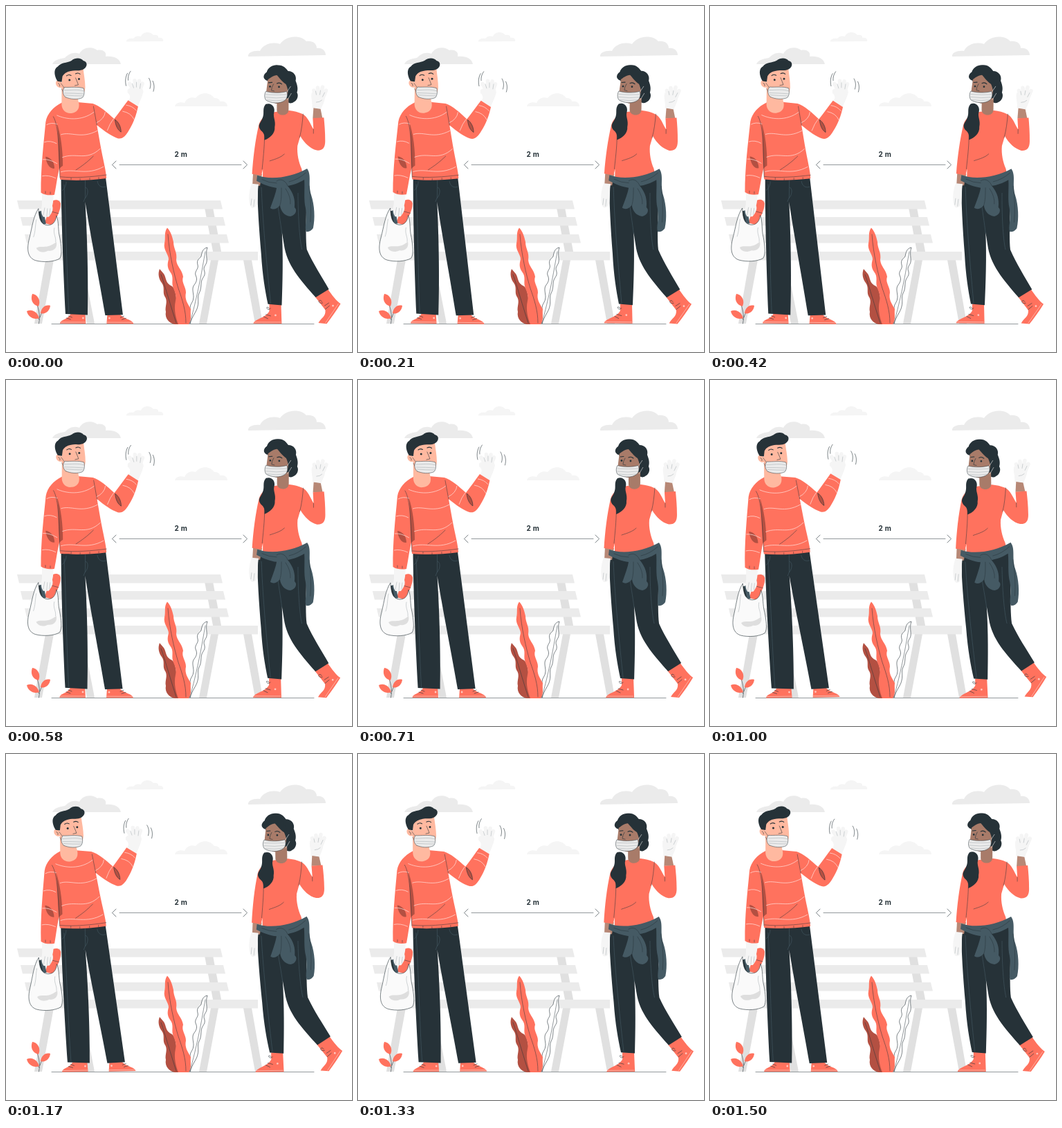
An HTML page that plays this animation: 500 px wide and 500 px high, repeating every 1.54 s.

```html
<!DOCTYPE html>
<html lang="en">
<head>
<meta charset="utf-8">
<title>Keep your distance</title>
<style>
html, body { margin: 0; width: 100%; height: 100%; overflow: hidden; background: #fff; }
svg { display: block; width: 100vw; height: 100vh; }
.coral { fill: #ff725e; }
.deep { fill: #b35042; }
.dark { fill: #263238; }
.slate { fill: #455a64; }
.glove { fill: #f5f5f5; }
.skin { fill: #ffb9a0; }
.brown { fill: #a87b69; }
.wrist { fill: #b78876; }
.mask { fill: #ebebeb; stroke: #263238; stroke-width: .5; }
.line, .fine, .brow { fill: none; stroke: #263238; stroke-width: .6; stroke-linecap: round; stroke-linejoin: round; }
.fine { stroke-width: .5; }
.brow { stroke-width: 1.1; }
.thin { fill: none; stroke: #a0a8ac; stroke-width: .5; stroke-linecap: round; }
.seam { fill: none; stroke: #455a64; stroke-width: .6; }
.knit { fill: none; stroke: #ffe3de; stroke-width: .7; }
.sole { fill: none; stroke: #ffc7be; stroke-width: .7; }
.eyelet { fill: #ffc7be; }
.finger { fill: none; stroke: #f5f5f5; stroke-width: 5.6; stroke-linecap: round; stroke-linejoin: round; }
text { font: 700 10px Inter, "Open Sans", sans-serif; letter-spacing: .3px; fill: #263238; }
</style>
</head>
<body>
<svg viewBox="0 0 500 500">
  <g id="clouds" fill="#ebebeb">
    <path d="M67 84C69 78 78 76 85 75C91 69 98 66 106 69C110 60 124 57 132 64C140 62 146 67 144 73C155 72 164 75 166 84Z"/>
    <path d="M350 73C349 67 358 64 367 65C371 56 384 51 396 55C403 44 424 40 434 51C443 50 449 54 449 61C457 60 462 65 462 71Z"/>
    <g fill="#f5f5f5">
      <path d="M174 51.5C173 48 180 46 184 47C187 43 191 43 195 44C198 37 208 36 213 42C218 41 221 43 220 46C225 45 228 48 227 51Z"/>
      <path d="M244 145C245 140 252 138 258 140C261 133 268 131 274 133C280 125 294 123 301 133C306 133 309 135 309 138C316 137 320 140 320 145Z"/>
    </g>
  </g>

  <g id="bench">
    <path fill="#e0e0e0" d="M285 281H297L312 360H300ZM57 367H69L52 459H41ZM99 367H110L128 459H117ZM296 367H307L290 459H279ZM343 367H355L371 459H360Z"/>
    <path fill="#ebebeb" d="M16 281H310L313 293.500H19ZM21 305H314L317 317.500H24ZM27 330H319L322 342.500H30ZM62 355H364V367.500H62Z"/>
  </g>

  <path class="fine" d="M66 459.500H445"/>

  <g id="sprig">
    <path class="line" d="M47.500 459C50 446 47 436 42 424M48 453C45 449 42 447 38 445M49 450C51 443 54 440 59 436"/>
    <path class="coral" d="M47 434C38 432 35 424 38 416C46 417 51 426 47 434ZM48 451C41 454 32 450 30 441C38 437 46 443 48 451ZM50 444C51 436 57 431 64 433C63 441 57 446 50 444Z"/>
  </g>

  <g id="leaves">
    <path fill="#fff" stroke="#263238" stroke-width=".6" d="M291 349C284 350 283 357 282 362C279 366 275 367 277 374C279 380 272 383 274 389C277 395 275 399 272 403C268 408 271 414 271 421C271 428 266 430 266 436C266 444 262 450 266 459C269 448 276 441 277 434C279 427 276 422 279 415C283 408 281 402 283 396C285 391 288 390 287 384C284 377 289 375 290 370C291 364 288 358 291 349Z"/>
    <path class="fine" d="M288 355C283 382 280 405 266 458"/>
    <path class="deep" d="M222 380C219 387 221 395 225 400C230 407 226 413 229 419C235 427 229 434 231 442C229 451 236 459 244 460H254C254 447 248 441 247 431C246 420 245 409 240 405C230 401 232 393 228 387Z"/>
    <path class="coral" d="M233 320.500C228 327 231 335 229 343C227 352 235 359 235 366C233 373 233 378 237 384C243 391 239 398 241 405C243 412 247 417 245 426C242 439 246 453 249 460H264C269 453 266 445 267 438C262 429 258 424 260 414C260 405 253 400 256 391C254 380 247 377 246 367C248 356 242 351 242 341C240 332 238 326 233 320.500Z"/>
    <path class="fine" d="M234 330C236 359 243 388 249 408C255 425 260 440 260 458M224 388C231 408 238 434 246 458"/>
  </g>

  <g id="gap">
    <path class="fine" d="M164 229.500H340"/>
    <path class="line" d="M159 224L153.500 229.500L159 235M343 224L348.500 229.500L343 235"/>
    <text x="252.900" y="218.200" text-anchor="middle">2 m</text>
  </g>

  <g id="man">
    <!-- shoes and trousers -->
    <path class="coral" d="M78.500 459C79 453 89 454 94 445H115L116 459ZM147 445H165C170 452 184 453 185 459H146Z"/>
    <path class="sole" d="M79 457H116M146 457H184"/>
    <path class="line" d="M88 451L94 453M91 448L96 450M174 451L168 453M171 448L166 450"/>
    <circle class="eyelet" cx="112" cy="451" r="1.400"/><circle class="eyelet" cx="150" cy="451" r="1.400"/>
    <path class="dark" d="M79.500 248C80 305 83 380 86.500 445L118.500 446.500C119.500 400 118 340 114.500 283C122 330 136 400 144 447L169.500 446L144 248Z"/>
    <path class="seam" d="M84 258C87 310 88 385 91.500 444M114.500 252V277L112 283M87 254C87 260 84 265 81 267M132 253C133 260 138 263 144 261M115 262C121 265 117 276 114 278"/>

    <!-- bag -->
    <path class="glove" d="M49 294C44 301 45 311 52 317L72 313L69 290Z"/>
    <path class="coral" d="M66 283C69 279 78 279 79 286C79 297 72 309 67 317L56 314Z"/>
    <path class="fine" d="M65 297L76 300"/>
    <path class="slate" d="M46 298L54 295L58 315L50 317Z"/>
    <path class="dark" d="M46 298L49 297L53 315L50 316Z"/>
    <path class="glove" d="M52 271L69 272C68 278 69 282 67 289C69 295 66 300 62 305H54C50 300 51 293 52 287Z"/>
    <path class="thin" d="M56 292L54 303M60 293L59 304M64 293L63 302"/>
    <path fill="#fafafa" stroke="#263238" stroke-width=".6" stroke-linejoin="round" d="M47 293C40 303 38 319 34 336C30 351 31 364 43 368C54 371 70 370 78 365C82 359 80 346 78 335C75 324 77 313 73 303C72 312 68 317 60 317C50 316 48 308 47 293Z"/>
    <path fill="#dedede" d="M44 350C51 345 59 353 73 341C75 350 69 355 61 354C53 358 46 355 44 350Z"/>
    <path class="thin" d="M44 309C42 320 43 325 40 334M70 321C68 330 73 334 72 341"/>

    <!-- raised glove -->
    <g class="finger">
      <path d="M185 123L178 112M187 121L185.500 107.500M190 121L192 108M192 124L196.500 112"/>
    </g>
    <path class="glove" d="M175 121C178 117 182 119 183 117C189 114 198 117 198 124C196 132 193 138 190 145L176 137C181 132 178 127 175 125Z"/>
    <path class="thin" d="M184 118L182 112M188 117V110M193 119L194 112"/>
    <path class="line" d="M179.500 94C176.500 98 175.500 103 176 107M175 97C172 102 171.500 109 173 115M206 104C209 109 209 114 207.500 119M211.500 108C214 113 214 118 212.500 123"/>

    <!-- jumper -->
    <path class="coral" d="M80 140C68 146 59 156 57 168C54 200 50 235 50.500 270C56 274 64 274 70 273C73 258 74 247 77 235L78 251C98 253 123 252 145 249C145 240 140 222 136 200L131 172C142 181 152 188 161 191C168 193 173 187 177 180C184 169 188 157 190.500 145L176 136C170 144 163 154 156 163C146 154 135 144 125 141L103 139Z"/>
    <path class="deep" d="M73 168C76 188 75 205 77 235L82 231C82 208 79 187 73 168ZM57 218C64 219 70 225 70 235C63 236 58 228 57 218Z"/>
    <path class="deep" stroke="#263238" stroke-width=".6" d="M157 164C158 173 161 179 166 182C166 174 162 167 157 164Z"/>
    <path class="knit" d="M58 172Q65 168 74 171M79 186C94 181 108 193 132 180M81 219C101 211 116 225 136 206M79 240C99 234 116 246 141 232M73 158C86 164 109 167 127 153M55 197Q64 194 73 199M53 222Q62 221 74 228M52 246Q61 244 72 249M130 169Q142 163 143 153M146 180Q150 169 155 163M168 152Q180 154 185 164M173 143Q182 144 188 151"/>
    <path class="fine" d="M68 160C76 173 76 206 78 248M79 247C99 249 124 247 145 244M101 237C110 231 117 226 126 217M126 145L131 172M57 271V268M64 272V269M94 251V248.500M107 252V249.500M121 251V248.500M134 250V247.500"/>

    <!-- head -->
    <path class="skin" d="M80 115V142C80 151 87 156 94 155C102 154 106 149 105 141L102 128Z"/>
    <path class="skin" d="M80 107C78 97 83 90 95 90H111C112 99 114 109 114 118C113 130 106 136 97 135C88 133 81 125 80 118C73 120 69 111 73 108C76 107 78 109 80 111Z"/>
    <path class="dark" d="M74 109C70 103 67 92 74 88C79 81 87 83 94 79C100 74 108 75 111 79C117 80 118 87 112 91C106 95 99 92 93 94C87 95 83 98 81 102L80 110Z"/>
    <path class="brow" d="M87 101Q90 98.500 93.500 100.500M100 98Q104 96 106.500 98.500"/>
    <path class="line" d="M100 104Q103 111 104 114L99 115M75 112Q78 113 77 116"/>
    <circle class="dark" cx="91.300" cy="107" r="1.500"/><circle class="dark" cx="105" cy="105.500" r="1.500"/>
    <path class="fine" d="M79 112L84 119M80 120L86 132"/>
    <path class="mask" d="M84 117.500C92 118 104 116 112 119C113 124 113 129 110 132.500C103 136 92 135 85 131.500C81 127 81 122 84 117.500Z"/>
    <path class="thin" d="M84 122C93 122 104 120 112 123M84 126Q97 126 112 127M85 129Q98 130 111 130"/>
  </g>

  <g id="woman">
    <!-- shoes and trousers -->
    <path class="coral" d="M381 431H398L399 459H358C360 452 376 451 381 441ZM447 420L465 408C471 417 479 427 484 430C478 440 471 450 464 459L452 458C456 450 463 449 462 439Z"/>
    <path class="sole" d="M359 457H398M481 430L462 458"/>
    <path class="line" d="M381 437C374 431 378 443 383 437M376 446L383 448M373 449L379 452M457 427C453 421 449 431 458 429M461 433L467 429M462 438L468 433"/>
    <circle class="eyelet" cx="390" cy="447" r="1.400"/><circle class="eyelet" cx="473" cy="433" r="1.400"/>
    <path class="dark" d="M363 248C363 285 366 324 369 358C371 390 375 412 379 431L399 432.500C400 401 401 364 399 327L402 345C406 374 425 395 448 421L467 409C456 390 444 372 435 352C432 325 436 287 433 248Z"/>
    <path class="seam" d="M391 275C394 297 397 313 399 329M369 262C371 307 375 354 383 430M422 270C422 300 424 335 428 352"/>

    <!-- resting hand -->
    <path class="wrist" d="M357 241L370 243L367 260H356Z"/>
    <path class="glove" d="M355 257L365 258C363 267 365 276 363 287C360 293 355 294 353 289C350 281 351 267 355 257Z"/>
    <path class="thin" d="M355 279L354 288M359 280L358 290"/>

    <!-- raised hand -->
    <path class="wrist" d="M444 147L454 148L457 162H443Z"/>
    <g class="finger">
      <path d="M449 131L444.500 122M451 130L450 118M454 131L457 117M457 134L462 122"/>
    </g>
    <path class="glove" d="M442 124C444 129 450 126 457 128L460 131C461 138 456 144 455 149L442 147C443 140 440 134 441 127Z"/>
    <path class="thin" d="M448 128L447 123M453 128L454 122M457 131L460 125M448 139Q453 139 456 136"/>

    <!-- top -->
    <path class="coral" d="M389 153C378 155 368 161 365 172C360 194 357 219 355.500 243L369 245L371 236L371 249H428C429 244 428 239 427 235C423 226 420 214 421 202L425 188C431 198 439 206 449 208.500C458 209 461 204 461 195C461 182 460 171 459 161L443 162L444 178C439 170 436 160 428 156C422 153 416 152 409 151Z"/>
    <path class="fine" d="M429 156C428 168 427 179 424 190M381 224C390 221 397 219 402 214M373 180C374 197 372 215 370 236M444 178L444 184"/>

    <!-- tied jacket -->
    <path class="slate" d="M363 245C382 252 412 248 435 235C442 245 436 257 441 273C446 288 447 307 444 321Q440 327 434 326C431 319 436 310 433 292C430 280 432 264 431 251C423 256 414 259 407 260C416 271 418 280 417 291C422 295 418 303 411 304C402 303 397 296 396 288C391 294 386 295 382 292C386 281 390 270 391 263C382 262 371 258 362 253Z"/>
    <path class="fine" d="M391 253C398 248 405 254 407 260M398 263C398 274 398 281 396 288M404 264Q412 276 411 286M370 251Q380 256 391 256M409 254Q422 251 433 241M438 260Q442 287 440 312"/>

    <!-- head -->
    <path class="dark" d="M376 107C370 106 371 99 376 96C378 89 385 85 392 85.500C400 85 404 90 407 94C415 94 420 101 418 108C420 113 422 119 420 125C423 130 420 137 415 139C411 142 407 140 404 136L392 130Z"/>
    <path class="brown" d="M391 135V151C392 160 408 160 408 150V133Z"/>
    <path class="brown" d="M378 105C383 97 392 95 398 99C401 107 406 111 407 118C408 132 402 141 390 141C380 139 374 131 376 121Z"/>
    <path class="dark" d="M376 108C371 106 372 98 378 95C386 88 398 90 402 97C404 104 411 109 413 114L412 130C407 127 407 119 404 113C398 109 394 103 391 100C386 100 381 104 376 108Z"/>
    <path class="dark" d="M375 142C384 139 389 147 387 154C385 160 390 166 388 175C389 184 381 191 373 194C374 187 372 183 368 180C362 172 368 169 370 163C374 155 369 149 375 142Z"/>
    <path class="brow" d="M379 111L384 110.500M391 112Q395 110 398 113"/>
    <circle class="dark" cx="381" cy="116.500" r="1.400"/><circle class="dark" cx="394" cy="117" r="1.400"/>
    <path class="line" d="M386 113Q383 118 383 122L387 123"/>
    <path d="M405 125L411 116M406 136L412 126" fill="none" stroke="#ebebeb" stroke-width=".6"/>
    <path class="mask" d="M375 123.500C384 126 397 126 405 123.500C407 128 406 133 403 136C396 142 382 141 375 136C372.500 132 373 127 375 123.500Z"/>
    <path class="thin" d="M375 128Q391 129 405 128M375 132Q390 134 405 132M377 136Q390 138 402 136"/>
  </g>
</svg>
<script>
const LOOP = 1540, LEAD = 70;
const sway = [
  { el: document.getElementById('man'), pivot: '121 268' },
  { el: document.getElementById('woman'), pivot: '418 272' }
];

// Triangle wave from -1 to 1, rising through 0 at phase 0.
const wave = p => 1 - 4 * Math.abs((p + 0.25) % 1 - 0.5);

function draw(ms) {
  const deg = wave((ms + LEAD) / LOOP % 1);
  for (const { el, pivot } of sway) el.setAttribute('transform', `rotate(${deg.toFixed(3)} ${pivot})`);
}

const start = performance.now();
function tick() {
  draw(performance.now() - start);
  requestAnimationFrame(tick);
}
tick();
</script>
</body>
</html>
```
